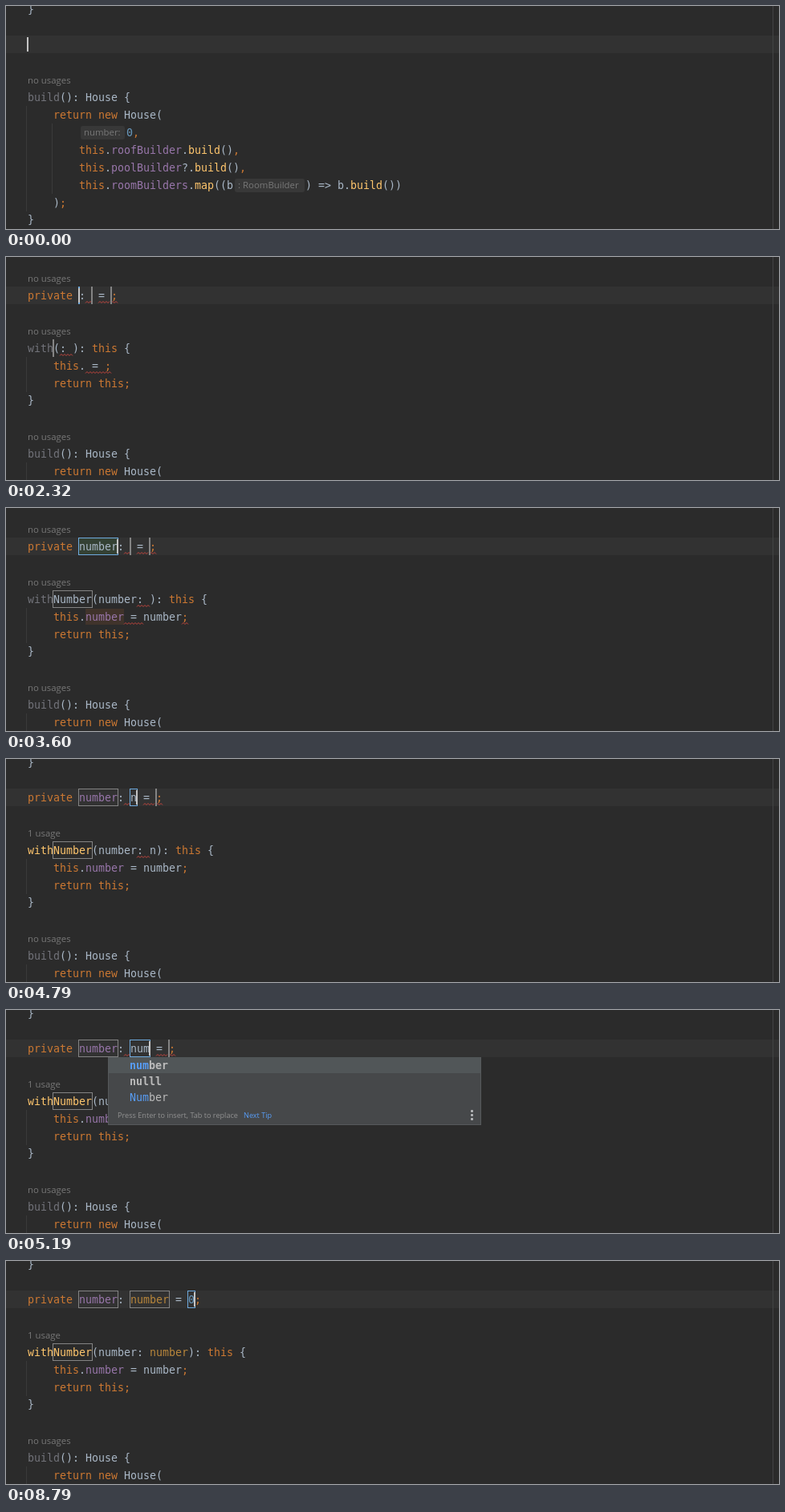
Recreate the animation shown at these times as an HTML page. Size 963x279 px, loop 8.92 s.

```html
<!DOCTYPE html>
<html lang="en">
<head>
<meta charset="utf-8">
<title>Builder template</title>
<style>
  html, body { margin: 0; width: 100%; height: 100%; overflow: hidden; background: #2b2b2b; }
  svg { display: block; }
  text { white-space: pre; font: 13.29px "DejaVu Sans Mono", monospace; font-variant-ligatures: none; }
  .bold { font-weight: bold; }
  .hint { font: 11.4px "Open Sans", sans-serif; fill: #787878; }
  .tip { font: 9.15px "Open Sans", sans-serif; fill: #919191; }
  .tip.link, .hit { fill: #589df6; }
</style>
</head>
<body>
<svg id="stage" width="963" height="279" viewBox="0 0 963 279"></svg>
<script>
const LOOP = 8920, CH = 8, LINE = 22;

// One letter per syntax colour.
const INK = {
  k: '#cc7832', t: '#a9b7c6', f: '#9876aa', m: '#ffc66d',
  g: '#72737a', n: '#6897bb', p: '#b8863b', i: '#bbbbbb', d: '#8c8c8c'
};

const rect = (x, y, w, h, fill, more = '') =>
  `<rect x="${x}" y="${y}" width="${w}" height="${h}" fill="${fill}" ${more}/>`;

// "kprivate |tname" : pieces split by a bar, each led by its colour letter.
const code = (x, y, src) => `<text x="${x}" y="${y + 5}">` + src.split('|')
  .map(p => `<tspan fill="${INK[p[0]]}">${p.slice(1).replace('>', '&gt;')}</tspan>`).join('') + '</text>';

const note = (x, y, s, cls = 'hint') => `<text class="${cls}" x="${x}" y="${y + 4}">${s}</text>`;
const pill = (x, y, w, s) => rect(x, y - 8, w, 17, '#383838', 'rx="3"') + note(x + 4, y, s);
const guide = (x, top, bottom) => rect(x, top, 1, bottom - top, '#3a3a3a');
const caretAt = x => rect(x - 1, 39, 2, 18, '#c4c4c4');
const mark = (x, y, n, fill) => rect(x, y - 10, n * CH, 20, fill);
const slot = (a, b, y, on) => rect(a - .5, y - 10.5, b - a + 1, 21, 'none',
  `stroke="${on ? '#6fabdf' : '#848484'}"`);

function wave(x, y, w) {
  let d = `M${x} ${y + 9.5}`;
  for (let i = 0; i < w / 2; i++) d += `l2 ${i % 2 ? 2 : -2}`;
  return `<path d="${d}" fill="none" stroke="#c4463f"/>`;
}

function page(body) {
  return rect(0, 0, 963, 279, '#2b2b2b') + rect(0, 37, 963, LINE, '#323232') +
    rect(955, 0, 1, 279, '#424344') + body;
}

function buildMethod(y) {
  const row = n => y + n * LINE;
  return note(27, y - 21, 'no usages') +
    guide(25, y + 11, y + 143) + guide(57, y + 33, y + 121) +
    code(27, y, 'gbuild|t(): House {') +
    code(59, row(1), 'kreturn new |tHouse(') +
    pill(93, row(2), 55, 'number:') + code(150, row(2), 'n0|k,') +
    code(91, row(3), 'kthis|t.|froofBuilder|t.|mbuild|t()|k,') +
    code(91, row(4), 'kthis|t.|fpoolBuilder|t?.|mbuild|t()|k,') +
    code(91, row(5), 'kthis|t.|froomBuilders|t.|mmap|t((b') +
    pill(285, row(5), 87, ': RoomBuilder') + code(373, row(5), 't) => b.|mbuild|t())') +
    code(59, row(6), 't)|k;') + code(27, row(7) - 1, 't}');
}

function stamp(x, y) {
  return `<path fill="#a4a8ab" d="M${x + 4} ${y - 6}h6v3h-2v4h5v3h-12v-3h5v-4h-2z"/>` +
    rect(x, y + 4, 14, 2, '#a4a8ab');
}

function discs(x, y) {
  const disc = (dx, dy, fill) =>
    `<circle cx="${x + dx}" cy="${y + dy}" r="5" fill="${fill}" stroke="#46484a"/>`;
  return disc(9, -2, '#5f9455') + disc(7, 0, '#c68a45') + disc(5, 2, '#3f8fb0');
}

// Items: "*" bold keyword, "@" module, "#" template with a description after ";".
function popup({ x, w = 465, items, tip = true }, typed) {
  const end = 59 + items.length * 20, height = end - 59 + (tip ? 25 : 20);
  let out = rect(x + .5, 59.5, w - 1, height - 1, '#46484a', 'stroke="#56595b"') +
    rect(x + 1, 59, w - 2, 20, '#515658');
  items.forEach((item, i) => {
    const y = 69 + i * 20, kind = item[0];
    const [label, about] = item.slice(1).split(';');
    const at = label.toLowerCase().indexOf(typed.toLowerCase()), to = at + typed.length;
    if (kind === '#') out += stamp(x + 8, y);
    if (kind === '@') out += discs(x + 8, y);
    out += `<text class="${kind === '*' ? 'bold' : ''}" x="${x + 27}" y="${y + 5}" fill="${INK.i}">` +
      `${label.slice(0, at)}<tspan class="hit">${label.slice(at, to)}</tspan>${label.slice(to)}</text>`;
    if (about) out += code(x + w - 12 - about.length * CH, y, 'd' + about);
  });
  if (!tip) return out + rect(x + w - 10, 60, 8, 33, '#626567');
  out += note(x + 12, end + 12, 'Press Enter to insert, Tab to replace', 'tip') +
    note(x + 169, end + 12, 'Next Tip', 'tip link');
  for (const dy of [7, 12, 17]) out += rect(x + w - 13, end + dy - 1, 3, 3, '#b4b6b8', 'rx="1"');
  return out;
}

function typing(s) {
  const n = s.word.length;
  return page(code(27, 4, 't}') +
    (s.word === 'with' ? mark(27, 48, 4, '#344134') : '') +
    (n ? code(27, 48, (s.word === 'with' ? 'k' : 't') + s.word) : '') +
    buildMethod(114) +
    (s.caret ? caretAt(27 + n * CH) : '') +
    (s.menu ? popup(s.menu, s.word) : ''));
}

function filling(s) {
  const { name, type, val } = s;
  const y = s.hints ? 114 : 92, body = y + LINE;
  const cap = name && name[0].toUpperCase() + name.slice(1);
  const a = 91, b = a + name.length * CH;
  const c = b + 16, d = c + type.length * CH;
  const e = d + 24, f = e + val.length * CH;
  const nameEnd = 59 + name.length * CH;
  const colon = nameEnd + CH + name.length * CH;
  const eq = 99 + name.length * CH, tail = eq + 24 + name.length * CH;
  const tone = s.known ? 'm' : s.lint ? 'g' : 'k';
  const typeTone = s.typed ? 'p' : 't';
  let out = s.hints === 1 ? note(27, 27, 'no usages') : code(27, 4, 't}');

  if (s.marks) out += mark(a, 48, name.length, '#344134') + mark(99, body, name.length, '#40332b');
  out += code(27, 48, `kprivate |${s.known ? 'f' : 't'}${name}|t: |${typeTone}${type}|t = |n${val}|k;`);
  if (s.hints) out += note(27, 93, s.hints === 1 ? 'no usages' : '1 usage');
  out += code(27, y, `${tone}with|${s.known ? 'm' : 't'}${cap}|t(${name}: |${typeTone}${s.echo}|t): |kthis |t{`) +
    code(59, body, `kthis|t.|f${name}|t = ${name}|k;`) +
    code(59, body + LINE, 'kreturn this;') +
    code(27, body + 2 * LINE - 1, 't}') +
    buildMethod(y + 6 * LINE);

  if (s.lint) {
    out += guide(25, y + 11, y + 55);
    if (!s.typed) out += wave(b + 8, 48, 8) + wave(d + 8, 48, 14) + wave(colon, y, 16);
    else if (!s.clean) out += wave(e - 8, 48, 7);
    if (!s.clean) out += wave(f, 48, 8);
    if (!s.known) out += name ? wave(eq, body, 24) + wave(tail, body, 8) : wave(eq, body, 32);
  }

  const slots = [[a, b], [c, d], [e, f]];
  slots.forEach(([p, q], i) => { if (i !== s.at) out += slot(p, q, 48); });
  out += slot(59, nameEnd, y) + slot(...slots[s.at], 48, true);
  if (s.caret) out += caretAt(slots[s.at][1]);
  if (s.menu) out += popup(s.menu, [name, type, val][s.at]);
  return page(out);
}

const templates = {
  x: -1,
  items: ['#withBuild;With a non nullable builder', '#withArr;With builder array',
    '#withField;With field', '#withNull;With nullable builder']
};
const modules = ['net', 'node:assert', 'node:async_hooks', 'node:buffer',
  'node:child_process', 'node:cluster', 'node:console'].map(s => '@' + s);
const types = (items, tip) => ({ x: 127, items, tip });
const words = ['*number', '*never', '*null', '*string'];

// Each step changes some fields and keeps the rest.
const steps = [
  [0, { draw: typing, word: '', caret: true, menu: null }],
  [260, { caret: false }],
  [780, { word: 'w', caret: true }],
  [860, { menu: templates }],
  [950, { word: 'wi' }],
  [1040, { word: 'wit' }],
  [1120, { word: 'with' }],
  [1380, { word: 'withF', menu: { x: -1, items: [templates.items[2]] } }],
  [1840, { draw: filling, menu: null, name: '', type: '', echo: '', val: '', at: 0, hints: 0 }],
  [2170, { lint: true }],
  [2320, { hints: 1 }],
  [2840, { name: 'n' }],
  [2910, { menu: { x: 63, w: 486, items: [templates.items[3]] } }],
  [3060, { name: 'nu' }],
  [3130, { menu: null }],
  [3320, { name: 'num' }],
  [3410, { name: 'numb' }],
  [3510, { name: 'numbe' }],
  [3600, { name: 'number', marks: true }],
  [3930, { known: true }],
  [4060, { hints: 2 }],
  [4260, { at: 1, marks: false }],
  [4790, { type: 'n', echo: 'n' }],
  [4850, { menu: types(words) }],
  [4920, { menu: types([...words, ...modules], false) }],
  [5000, { type: 'nu', echo: 'nu' , menu: types(['*number', '*null', ' Number']) }],
  [5130, { type: 'num', echo: 'num' }],
  [5260, { menu: types(['*number', ' Number']) }],
  [5460, { type: 'number', menu: null }],
  [5530, { echo: 'number' }],
  [5880, { typed: true }],
  [6140, { at: 2 }],
  [6920, { val: '0' }],
  [7270, { clean: true }],
  [8330, { caret: false }],
  [8790, { caret: true }]
];

let last = {};
const states = steps.map(([time, change]) => ({ time, ...(last = { ...last, ...change }) }));
const stage = document.getElementById('stage');
let shown = null;

function tick() {
  const t = performance.now() % LOOP;
  const now = states.filter(s => s.time <= t).pop();
  if (now !== shown) {
    stage.innerHTML = now.draw(now);
    shown = now;
  }
  requestAnimationFrame(tick);
}
tick();
</script>
</body>
</html>
```
